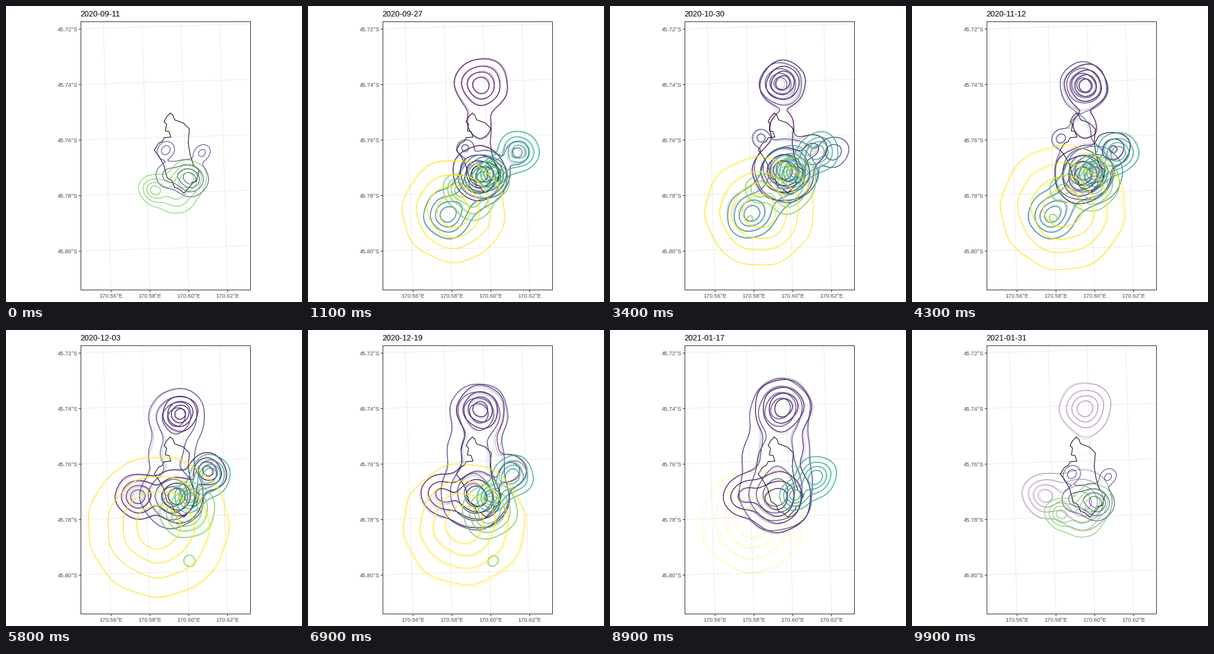
Recreate the animation shown at these times as a matplotlib script. Size 480 by 480 pixels, loop 10 s.

```python
import numpy as np
import matplotlib.pyplot as plt
from matplotlib.animation import FuncAnimation
from matplotlib.collections import LineCollection

FRAMES, DAYS = 100, 142
START = np.datetime64("2020-09-11")
PX = 0.72  # points per pixel at 100 dpi
LEVELS = (0.1, 0.3, 0.55, 0.8)
WAKE = ((1, 1.0), (0.4, 0.85), (0.25, 0.7), (0.12, 0.6))  # alpha, width
KEYS = (0, 21, 34, 43, 58, 80, 99)
GX, GY = np.meshgrid(np.arange(123, 397, 3.0), np.arange(60, 456, 3.0))

# Every home range is a sum of bells (x, y, spread, weight); a value is
# either constant or one number per key time.
RANGES = {
    "#440154": ((1, 98), [
        (281, (126, 126, 126, 130, 134, 124, 127), (20, 20, 17, 16, 13, 23, 19), 1),
        (279, 192, (18, 18, 18, 18, 20, 30, 20), (0.17, 0.17, 0.17, 0.17, 0, 0.4, 0.05)),
        ((278, 278, 280, 275, 278, 268, 275), (272, 272, 266, 274, 268, 270, 276),
         (20, 20, 23, 21, 20, 28, 22), 1),
        (215, 268, 17, (0, 0, 0, 0, 1, 0.2, 1)),
        (328, 230, 14, (0, 0, 0.35, 0.6, 0.95, 0, 0)),
    ]),
    "#414487": ((0, 92), [
        (277, (126, 126, 126, 130, 140, 126, 126), (16, 16, 16, 18, 21, 22, 22), (0, 0, 1, 1, 1, 1, 1)),
        (270, 198, (20, 20, 20, 18, 22, 32, 32), (0, 0, 0, 0.15, 0.4, 0.4, 0.4)),
        ((297, 278, 285, 278, 270, 268, 268), (279, 268, 266, 268, 268, 268, 268),
         (14, 22, 24, 22, 24, 27, 27), 1),
        ((318, 358, 362, 340, 330, 330, 330), 236, (8, 14, 14, 12, 8, 8, 8), (0.38, 0.4, 0.45, 0, 0, 0, 0)),
        ((259, 250, 244, 240, 240, 240, 240), (233, 225, 212, 212, 212, 212, 212), 8,
         (0.45, 0.3, 0.4, 0.4, 0, 0, 0)),
        (263, 276, 12, (0.4, 0, 0, 0, 0, 0, 0)),
    ]),
    "#2A788E": ((1, 52), [
        (227, 337, 18, 1),
        ((285, 285, 290, 295, 295, 295, 295), (280, 280, 270, 272, 272, 272, 272),
         (18, 18, 21, 22, 22, 22, 22), 0.95),
        (258, 307, 18, 0.3),
    ]),
    "#22A884": ((1, 95), [
        ((342, 342, 337, 335, 332, 332, 336), 235, 15, 1),
        (297, 270, 11, 1),
        (318, 255, 12, 0.3),
    ]),
    "#6ACD4E": ((0, 72), [
        (296, (280, 283, 282, 282, 290, 290, 290), (14, 13, 18, 19, 20, 20, 20), 1),
        (242, 297, 12, (0.9, 0.9, 0.5, 0.35, 0, 0, 0)),
        ((275, 265, 285, 285, 285, 285, 285), (305, 325, 308, 305, 305, 305, 305), 16,
         (0.6, 0.7, 0.4, 0.3, 0.3, 0.3, 0.3)),
        (228, 342, 7, (0, 0, 0.13, 0.15, 0, 0, 0)),
        (298, 374, 8, (0, 0, 0, 0, 0.2, 0.15, 0)),
    ]),
    "#FDE725": ((1, 88), [
        ((234, 236, 243, 245, 246, 262, 180), (333, 331, 333, 327, 317, 311, 311),
         (40, 37, 41, 47, 53, 38, 38), 1),
    ]),
}


def value(v, t):
    return np.interp(t, KEYS, v) if np.ndim(v) else v


def density(bells, t, seed):
    """Bells that wander a little from day to day, with a rippled edge."""
    gx = GX + 1.3 * np.sin(GY / 10 + seed + 0.2 * t)
    gy = GY + 1.3 * np.sin(GX / 11 + 2 * seed - 0.15 * t)
    z = np.zeros_like(GX)
    for k, bell in enumerate(bells):
        x, y, s, w = (value(v, t) for v in bell)
        x += 1.2 * np.sin(0.9 * t + k + seed)
        y += 1.2 * np.sin(0.7 * t + 2 * k + seed)
        z += w * np.exp(-((gx - x) ** 2 + (gy - y) ** 2) / (2 * s * s))
    return z


fig = plt.figure(figsize=(4.8, 4.8), dpi=100, facecolor="white")
ax = fig.add_axes([0, 0, 1, 1])
ax.set(xlim=(-0.4, 479.6), ylim=(479.4, -0.6))
ax.axis("off")


def line(x, y, color, **kw):
    ax.plot(x, y, color=color, lw=PX, **kw)


def label(x, y, s, px, color, **kw):
    return ax.text(x, y, s, fontsize=px * PX, color=color, family="Liberation Sans", **kw)


def rings(bells, t, seed):
    cs = ax.contour(GX, GY, density(bells, t, seed), levels=LEVELS)
    found = [p for path in cs.get_paths() for p in path.to_polygons(closed_only=False)]
    cs.remove()
    return found


def scene_at(i):
    """Outlines by colour; the last frame is back at the opening."""
    t = i % (FRAMES - 1)
    return {color: rings(bells, t, seed)
            for seed, (color, ((first, last), bells)) in enumerate(RANGES.items())
            if first <= t <= last}


scenes = [scene_at(i) for i in range(FRAMES)]

for k in range(4):
    x = 170 + 63 * k
    line([x, x - 12.8], [459, 24], "#ebebeb")
    line([x, x], [460, 462], "#333333")
    label(x - 0.3, 472.3, f"170.{56 + 2 * k}°E", 9.1, "#4d4d4d", ha="center")
for k in range(5):
    y = 36.5 + 90 * k
    line([121, 396], [y, y - 8.2], "#ebebeb")
    line([118, 120], [y, y], "#333333")
    label(116, y + 3.8, f"45.{72 + 2 * k}°S", 9.1, "#4d4d4d", ha="right")
line([121, 396, 396, 121, 121], [24, 24, 459, 459, 24], "#333333", zorder=5)

coast = np.array([
    266,173, 260,179, 256,187, 260,191, 258,202, 264,203, 267,212, 256,213, 253,219, 247,222, 240,233, 247,242,
    255,256, 261,278, 269,283, 273,294, 279,295, 288,303, 301,289, 301,285, 308,284, 313,266, 304,259, 298,240,
    295,221, 297,199, 287,189, 273,184, 270,176, 266,173]).reshape(-1, 2)
line(*coast.T, "black", zorder=2.5)

outlines = LineCollection([], zorder=3)
ax.add_collection(outlines, autolim=False)
title = label(120, 16.6, "", 12.7, "black")


def draw(i):
    segs, colors, widths = [], [], []
    for color in RANGES:
        rgb = [int(color[k:k + 2], 16) / 255 for k in (1, 3, 5)]
        for back, (alpha, width) in reversed(list(enumerate(WAKE))):
            found = scenes[i - back].get(color, []) if i >= back else []
            segs += found
            colors += [(*rgb, alpha)] * len(found)
            widths += [width * PX] * len(found)
    outlines.set_segments(segs)
    outlines.set_color(colors)
    outlines.set_linewidth(widths)
    title.set_text(str(START + int(round(DAYS * i / (FRAMES - 1)))))
    return outlines, title


anim = FuncAnimation(fig, draw, frames=FRAMES, interval=100, repeat=True, repeat_delay=0,
                     init_func=lambda: draw(0))
plt.show()
```
